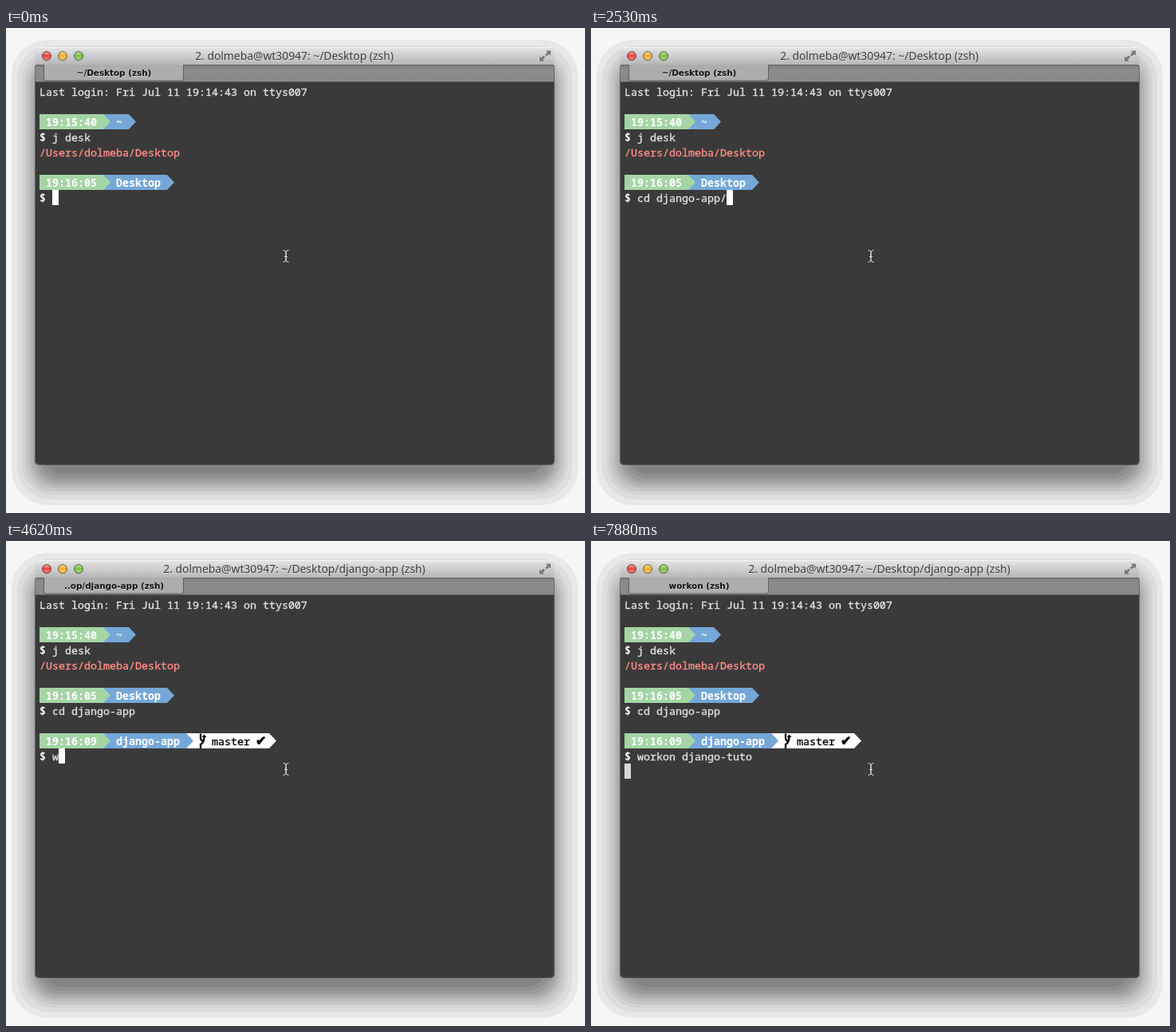
These frames come from a looping animation (726x608 px, 8000 ms). An HTML page:

```html
<!DOCTYPE html>
<html lang="en">
<head>
<meta charset="utf-8">
<title>Terminal session</title>
<style>
  html, body { margin: 0; width: 100%; height: 100%; overflow: hidden; background: #f6f6f6; }
  svg { display: block; }
  text { white-space: pre; }
  .mono { font: 500 13.333px "Noto Sans Mono", monospace; fill: #e2e2e2; stroke: #e2e2e2; stroke-width: .35px; }
  .bold { font-weight: 600; fill: #fff; stroke: none; }
  .dark { fill: #000; stroke: #000; }
  .path { fill: #ff8c87; stroke: #ff8c87; }
  .check { font: 16px "DejaVu Sans", sans-serif; stroke-width: .9px; }
  .title { font: 13.87px "Noto Sans", sans-serif; fill: #3c3c3c; text-anchor: middle; }
  .tab { font: bold 10.4px "DejaVu Sans", sans-serif; fill: #111; text-anchor: middle; }
  .title, .tab { text-shadow: 0 1px 0 #ffffff80; }
</style>
</head>
<body>
<svg width="726" height="608" viewBox="0 0 726 608">
  <defs>
    <linearGradient id="bar" x2="0" y2="1">
      <stop stop-color="#e6e6e6"/><stop offset="1" stop-color="#b6b6b6"/>
    </linearGradient>
    <linearGradient id="strip" x2="0" y2="1">
      <stop stop-color="#808080"/><stop offset=".3" stop-color="#8c8c8c"/><stop offset="1" stop-color="#888"/>
    </linearGradient>
    <linearGradient id="gloss" x2="0" y2="1">
      <stop stop-color="#fff" stop-opacity=".6"/><stop offset=".45" stop-color="#fff" stop-opacity="0"/>
      <stop offset="1" stop-color="#fff" stop-opacity=".4"/>
    </linearGradient>
  </defs>

  <g id="shadow"></g>

  <path d="M36.500 47V543q0 4.500 4.500 4.500H683q4.500 0 4.500-4.500V47" fill="none" stroke="#0006"/>
  <rect x="37" y="40" width="650" height="507" rx="4" fill="#3a3a3a"/>
  <path d="M37 46V29q0-5 5-5H682q5 0 5 5V46Z" fill="url(#bar)"/>
  <path d="M41 24.500H683" stroke="#f4f4f4"/>
  <rect x="37" y="46" width="650" height="22" fill="url(#strip)"/>
  <path d="M37 46.500H47M223 46.500H687M37 67.500H687" stroke="#5c5c5c"/>
  <path d="M47.500 46V63q0 3 3 3H219.500q3 0 3-3V46Z" fill="#adadad"/>
  <path d="M47.500 46V63q0 3 3 3H219.500q3 0 3-3V46" fill="none" stroke="#5e5e5e"/>
  <g id="lights"></g>
  <g fill="#777">
    <path d="M677 28.500H683V34.500L681 32.500 678 35.500 676 33.500 679 30.500Z"/>
    <path d="M669 35.500V41.500H675L673 39.500 676 36.500 674 34.500 671 37.500Z"/>
  </g>
  <text id="title" class="title" x="361.500" y="40"></text>
  <text id="tab" class="tab" x="135.500" y="60"></text>

  <g id="history"></g>
  <g id="gitPrompt"></g>
  <text id="first" class="mono" x="58" y="218"></text>
  <text id="second" class="mono" x="58" y="275"></text>
  <rect id="cursor" width="8" height="19"/>

  <path d="M347.500 278.500q3.500 0 3.500 3V290.500q0 3-3.500 3M354.500 278.500q-3.500 0-3.500 3V290.500q0 3 3.500 3M349 286.500H353"
    fill="none" stroke="#dcdcdc"/>
</svg>
<script>
const $ = id => document.getElementById(id);
const LEFT = 42, CELL = 8, ROW = 19;
const rowTop = row => 70 + row * ROW;

const line = (x, row, text, cls = '') =>
  `<text class="mono ${cls}" x="${x}" y="${rowTop(row) + 15}">${text}</text>`;

// Bar from the left margin to `end`, closed by an arrow head
const arrow = (end, row, fill) => {
  const y = rowTop(row);
  return `<path d="M${LEFT} ${y}H${end}L${end + 9} ${y + ROW / 2}L${end} ${y + ROW}H${LEFT}Z" fill="${fill}"/>`;
};

const prompt = (row, clock, dir) =>
  arrow(122 + CELL * (dir.length + 3), row, '#75a8d8') + arrow(122, row, '#a5d5a5') +
  line(50, row, clock, 'bold') + line(138, row, dir, 'bold') + line(LEFT, row + 1, '$', 'bold');

// Banded window shadow, dropped 21 px below the window
$('shadow').innerHTML = [30, 23, 17, 13, 9, 6, 3, 0, -4, -9].map((grow, i) => {
  const grey = 232 - i * 11;
  return `<rect x="${37 - grow}" y="${45 - grow}" width="${650 + 2 * grow}" height="${523 + 2 * grow}"
    rx="${30 + grow / 2}" fill="rgb(${grey},${grey},${grey})"/>`;
}).join('');

$('lights').innerHTML = ['#e8453c', '#f0ab2e', '#7dbb42'].map((fill, i) => {
  const x = 51 + 20 * i;
  return `<circle cx="${x}" cy="35" r="5.500" fill="${fill}" stroke="#0007"/>
    <circle cx="${x}" cy="35" r="4.500" fill="url(#gloss)"/>`;
}).join('');

$('history').innerHTML =
  line(LEFT, 0, 'Last login: Fri Jul 11 19:14:43 on ttys007') +
  prompt(2, '19:15:40', '~') + line(58, 3, 'j desk') +
  line(LEFT, 4, '/Users/dolmeba/Desktop', 'path') +
  prompt(6, '19:16:05', 'Desktop');

$('gitPrompt').innerHTML =
  arrow(330, 9, '#fff') + prompt(9, '19:16:09', 'django-app') +
  line(258, 9, 'master', 'dark') + line(313, 9, '✔', 'dark check') +
  `<path d="M244 241.500V248L246 251M244 260V255Q248.500 253 248.500 245" fill="none" stroke="#000" stroke-width="2.300"/>
   <path d="M245.500 246L248.500 242.500 251.500 246Z"/>`;

const firstKeys = [[0, ''], [1200, 'c'], [1350, 'cd'], [1800, 'cd '], [2090, 'cd dj'], [2240, 'cd dja'],
  [2530, 'cd django-app/'], [3280, 'cd django-app']];
const secondKeys = [[0, ''], [4620, 'w'], [4770, 'wo'], [4910, 'wor'], [5060, 'work'], [5800, 'workon'],
  [6100, 'workon '], [6400, 'workon dj'], [6540, 'workon dja'], [6690, 'workon djan'], [6840, 'workon djang'],
  [6990, 'workon django'], [7130, 'workon django-tuto ']];
const titles = [[0, '~/Desktop'], [3430, '~/Desktop/django-app']];
const tabs = [[0, '~/Desktop'], [3280, '..op/django-app'], [7880, 'workon']];
const cursorRows = [[0, 7], [3280, 8], [3720, 10], [7880, 11]];

const valueAt = (steps, t) => steps.findLast(([start]) => start <= t)[1];

function draw(t) {
  const first = valueAt(firstKeys, t), second = valueAt(secondKeys, t);
  $('first').textContent = first;
  $('second').textContent = second;
  $('title').textContent = `2. dolmeba@wt30947: ${valueAt(titles, t)} (zsh)`;
  $('tab').textContent = `${valueAt(tabs, t)} (zsh)`;
  $('gitPrompt').style.display = t < 3720 ? 'none' : '';

  const row = valueAt(cursorRows, t);
  const running = row === 8 || row === 11;
  const typed = row === 7 ? first : second;
  const cursor = $('cursor');
  cursor.setAttribute('x', running ? LEFT : 58 + CELL * typed.length);
  cursor.setAttribute('y', rowTop(row));
  cursor.setAttribute('fill', running ? '#d8d8d8' : '#fff');
  cursor.style.display = t >= 5500 && t < 5800 ? 'none' : '';
}

const begin = performance.now();
function tick() {
  draw((performance.now() - begin) % 8000);
  requestAnimationFrame(tick);
}
tick();
</script>
</body>
</html>
```
